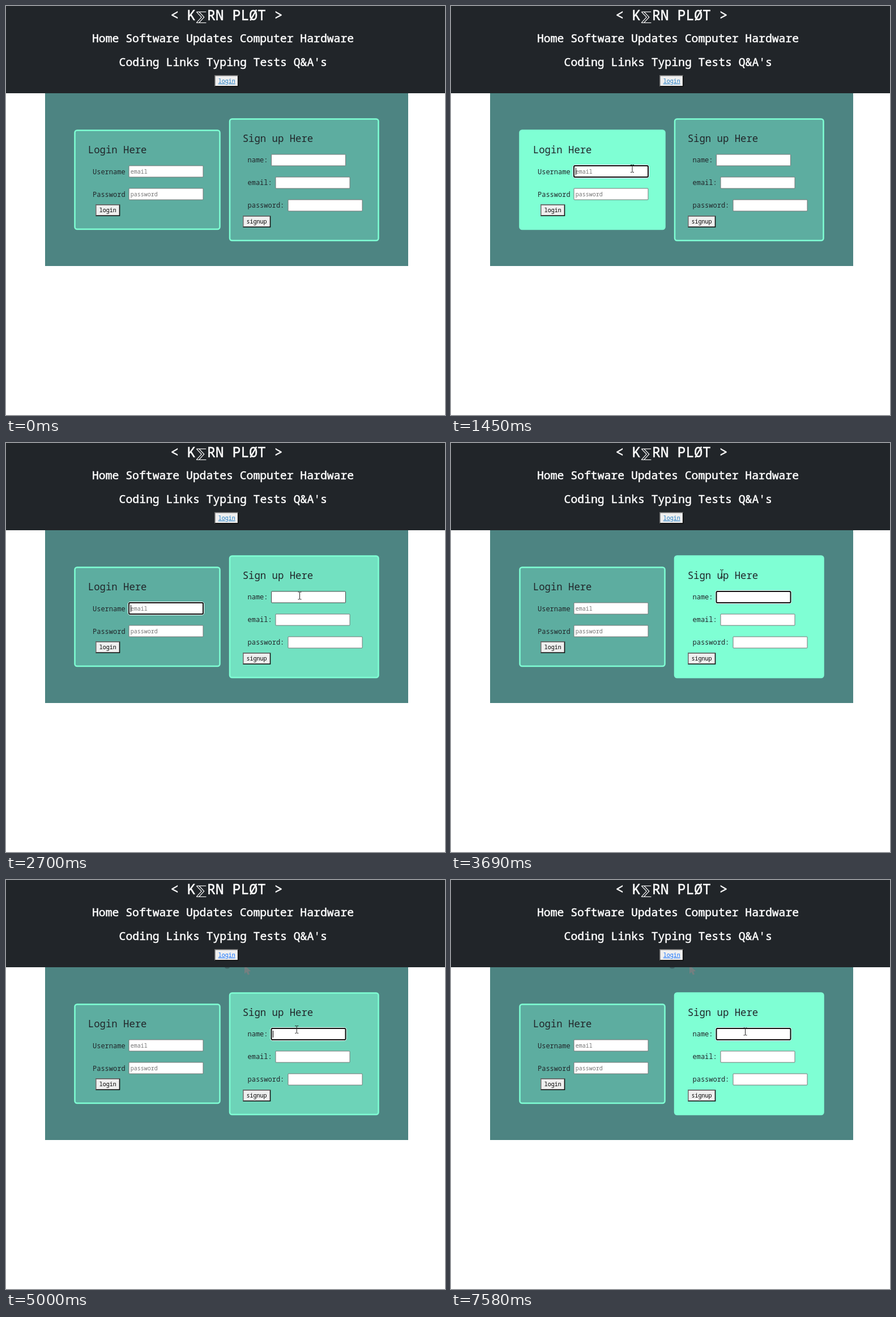
Animation of 775x722 px, one loop 8 s. Source, as an HTML page:

```html
<!DOCTYPE html>
<html lang="en">
<head>
<meta charset="utf-8">
<title>Login</title>
<style>
  html, body { margin: 0; width: 100%; height: 100%; overflow: hidden; background: #fff; }
  svg { display: block; width: 100vw; height: 100vh; }
  text { font-family: "Noto Sans Mono", "DejaVu Sans Mono", monospace; font-size: 12px; fill: #212529; }
  .title, .nav { font-weight: 500; fill: #fff; stroke: #fff; stroke-width: .5; }
  .title { font-size: 24.75px; }
  .nav { font-size: 19.75px; }
  .sigma { font-family: "DejaVu Sans", sans-serif; font-size: 22.5px; font-weight: 400; stroke: none; }
  .head { font-size: 17.3px; }
  .small { font-size: 10px; fill: #000; }
  .hint { font-size: 10px; fill: #757575; }
  .card { fill: #5dada0; stroke: #7fffd4; stroke-width: 2.5; }
  .field { fill: #fff; stroke: #767676; }
  .field.hover { stroke: #454545; }
  #link { text-decoration: underline; }
</style>
</head>
<body>
<svg viewBox="0 0 775 722">
  <rect width="775" height="154" fill="#212529"/>
  <text class="title" y="25"><tspan x="290.3">&lt; K</tspan><tspan class="sigma" x="335.5" y="25.6">⅀</tspan><tspan x="355" y="25">RN PLØT &gt;</tspan></text>
  <text class="nav" x="152" y="64">Home Software Updates Computer Hardware</text>
  <text class="nav" x="199.6" y="105.5">Coding Links Typing Tests Q&amp;A's</text>

  <rect x="69" y="154" width="641" height="305" fill="#4d8482"/>
  <g id="trace" fill="#747f80">
    <path d="M386 154h9q-1 2.5-4.5 2.5t-4.5-2.5z" fill="#3f6465"/>
    <path d="M421 154h4l7 7-4 .5 2 5-3 1-2.5-5-3.5 3z"/>
  </g>

  <rect class="card" id="loginCard" x="121.5" y="219.5" width="256" height="174.5" rx="4"/>
  <rect class="card" id="signCard" x="395" y="199.5" width="262.5" height="214.5" rx="4"/>

  <text class="head" x="144.8" y="260">Login Here</text>
  <text x="153" y="296.5">Username</text>
  <text x="153" y="336.5">Password</text>
  <text class="head" x="417.7" y="240">Sign up Here</text>
  <text x="426.5" y="276">name:</text>
  <text x="426.5" y="316">email:</text>
  <text x="426.5" y="356">password:</text>

  <g id="fields"></g>
  <g id="ring" fill="none">
    <rect x="-1.5" y="-1.5" width="134" height="23" rx="3.5" stroke="#fff"/>
    <rect width="131" height="20" rx="2" stroke="#101010" stroke-width="2"/>
  </g>
  <text class="hint" x="219.8" y="296">email</text>
  <text class="hint" x="219.8" y="336">password</text>
  <rect id="caret" width="1" height="12"/>

  <g id="buttons"></g>
  <text class="small" id="link" x="374.7" y="136">login</text>
  <text class="small" x="164.8" y="364">login</text>
  <text class="small" x="424.6" y="384.3">signup</text>

  <g id="pointer">
    <path id="arrow" d="M0 0V14.5l3.4-3.2 2.3 5.2 2.5-1.1-2.3-5h4.7z" fill="#fff" stroke="#000" stroke-width=".9"/>
    <path id="beam" d="M-3-6.5h2.2l.8.8.8-.8H3M0-5.7V5.7M-3 6.5h2.2l.8-.8.8.8H3" fill="none" stroke="#222"/>
    <path id="hand" d="M-1.6 1.5q0-1.7 1.6-1.7t1.6 1.7v5q1.5-1 2.6.5 1.7-.9 2.5.7 2.3-.5 2.3 1.8v4.2q0 2.5-1.7 4.3v1.5h-7.3v-1.5l-5-6.5q-1-1.7.4-2.3 1.3-.4 3 1.6z" fill="#fff" stroke="#000" stroke-width=".9"/>
  </g>
</svg>
<script>
const LOOP = 8000;
const $ = id => document.getElementById(id);

function add(parent, tag, attrs) {
  const el = document.createElementNS("http://www.w3.org/2000/svg", tag);
  for (const k in attrs) el.setAttribute(k, attrs[k]);
  return parent.appendChild(el);
}

const fields = [[217, 282], [217, 322], [468.5, 262], [476, 302], [498, 342]].map(([x, y]) =>
  add($("fields"), "rect", { class: "field", x, y, width: 131, height: 20, rx: 1 }));
const [user, , name] = fields;

for (const [x, y, w] of [[368, 122, 42.5], [158, 350.3, 43.3], [418, 370.3, 49.3]]) {
  const h = 20.6, edge = 1.6, b = $("buttons");
  add(b, "rect", { x, y, width: w, height: h, fill: "#111" });
  add(b, "path", { d: `M${x} ${y + h}V${y}H${x + w}l-2 2H${x + 2}V${y + h - 2}z`, fill: "#707070" });
  add(b, "rect", { x: x + edge, y: y + edge, width: w - 2 * edge, height: h - 2 * edge, fill: "#efefef" });
}

// time, x, y, shape
const path = [
  [100, 699, 668, "arrow"], [250, 650, 590, "arrow"], [400, 560, 462, "arrow"],
  [480, 523, 410, "arrow"], [560, 400, 338, "arrow"], [630, 345, 305, "beam"],
  [700, 320, 287, "beam"], [2290, 320, 287, "beam"], [2340, 355, 286, "arrow"],
  [2420, 440, 278, "arrow"], [2470, 490, 272, "beam"], [2550, 518.5, 269.5, "beam"],
  [3620, 518.5, 269.5, "beam"], [3690, 478.5, 231, "beam"], [3740, 455, 197, "arrow"],
  [3830, 422, 158, "arrow"], [3910, 398, 141, "hand"], [4040, 387.5, 136.5, "hand"],
  [4480, 387.5, 136.5, "hand"], [4540, 405, 144, "arrow"], [4620, 421, 153, "arrow"],
  [4790, 470, 200, "arrow"], [4880, 495, 240, "arrow"], [4960, 510, 262, "beam"],
  [5080, 519.5, 267.5, "beam"], [LOOP, 519.5, 267.5, "beam"]
];

const within = (t, a, b) => t >= a && t < b;
const fade = (t, start, end) => within(t, start, end) ? Math.min(1, (t - start) / 450) : 0;
const blink = (t, start, half) => Math.floor((t - start) / half) % 2 === 0;

function tint(el, k) {
  const from = [93, 173, 160], to = [127, 255, 212];
  el.style.fill = `rgb(${from.map((c, i) => Math.round(c + (to[i] - c) * k))})`;
}

function show(el, on) {
  el.style.display = on ? "" : "none";
}

function movePointer(t) {
  show($("pointer"), t > path[0][0]);
  if (t <= path[0][0]) return;
  const i = path.findIndex(p => p[0] > t);
  const [t0, x0, y0, shape] = path[i - 1], [t1, x1, y1] = path[i];
  const k = (t - t0) / (t1 - t0);
  $("pointer").setAttribute("transform", `translate(${x0 + (x1 - x0) * k} ${y0 + (y1 - y0) * k})`);
  for (const id of ["arrow", "beam", "hand"]) show($(id), id === shape);
}

function draw(t) {
  tint($("loginCard"), fade(t, 540, 2360));
  tint($("signCard"), fade(t, 2417, 3740) || fade(t, 4790, LOOP));
  user.classList.toggle("hover", within(t, 690, 2300));
  name.classList.toggle("hover", within(t, 2470, 3640));

  const onName = t >= 2840, target = onName ? name : user;
  show($("ring"), t >= 1380);
  $("ring").setAttribute("transform", `translate(${target.getAttribute("x")} ${target.getAttribute("y")})`);
  $("caret").setAttribute("x", onName ? 471 : 220);
  $("caret").setAttribute("y", onName ? 266 : 286);
  show($("caret"), t >= 1430 && (onName ? blink(t, 2833, 525) : blink(t, 1430, 530)));

  $("link").style.fill = t < 3910 ? "#1f7cc4" : t < 4540 ? "#2a5ba8" : "#0d6efd";
  show($("trace"), t >= 4700);
  movePointer(t);
}

const begin = performance.now();
function tick() {
  draw((performance.now() - begin) % LOOP);
  requestAnimationFrame(tick);
}
tick();
</script>
</body>
</html>
```
